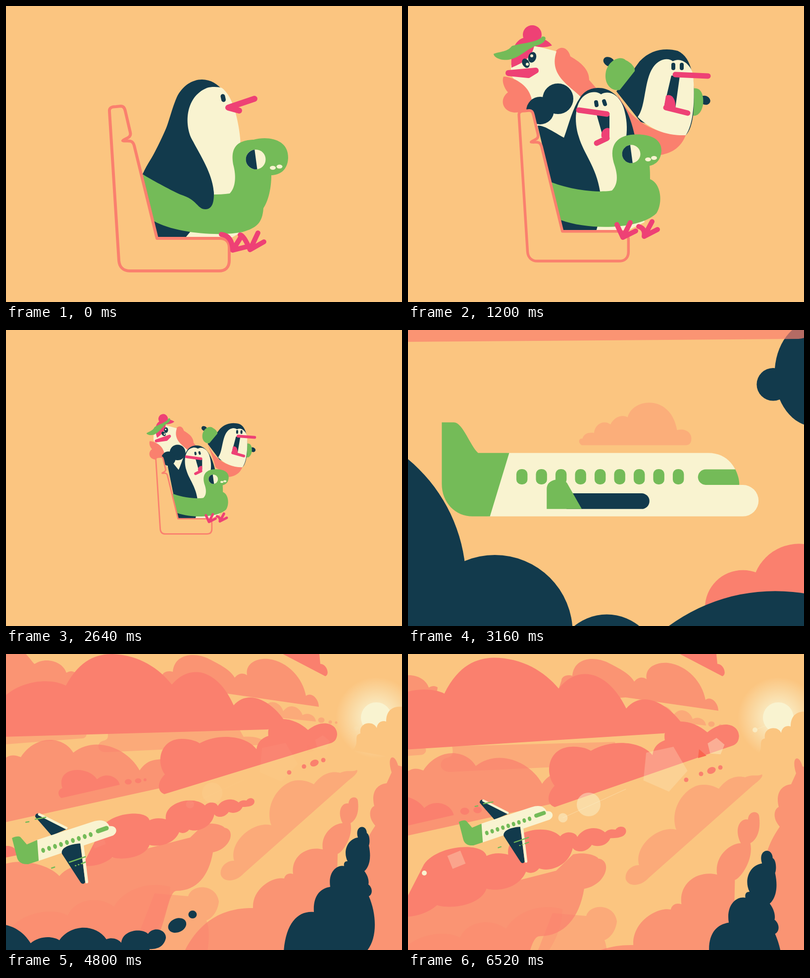
An HTML page with a canvas that plays this animation: 800x600 px, repeating every 6.56 s.

```html
<!DOCTYPE html>
<html lang="en">
<head>
<meta charset="utf-8">
<title>Holiday flight</title>
<style>
html, body { margin: 0; height: 100%; overflow: hidden; background: #fbc580; }
canvas { display: block; }
</style>
</head>
<body>
<canvas id="stage" width="800" height="600"></canvas>
<script>
const ctx = document.getElementById('stage').getContext('2d');
const SKY = '#fbc580', NAVY = '#123a4c', CREAM = '#f9f3d0', CORAL = '#fa806e', PINK = '#ee4175', GREEN = '#74bb58';
const LOOP = 6560, CAST_SCALE = 0.914;

const lerp = (a, b, k) => a + (b - a) * k;
const ramp = (t, a, b) => Math.min(1, Math.max(0, (t - a) / (b - a)));
const smooth = k => k * k * (3 - 2 * k);
const backOut = k => 1 + 2.4 * (k - 1) ** 3 + 1.4 * (k - 1) ** 2;

// Blends two paths that share the same commands.
function mix(a, b, k) {
  const ends = b.match(/-?[\d.]+/g);
  let i = 0;
  return a.replace(/-?[\d.]+/g, v => lerp(+v, +ends[i++], k));
}
function fill(d, color, alpha = 1) {
  ctx.globalAlpha = alpha;
  ctx.fillStyle = color;
  ctx.fill(new Path2D(d));
  ctx.globalAlpha = 1;
}
function line(d, color, width) {
  ctx.strokeStyle = color;
  ctx.lineWidth = width;
  ctx.lineCap = ctx.lineJoin = 'round';
  ctx.stroke(new Path2D(d));
}
function dot(color, x, y, rx, ry = rx, turn = 0) {
  ctx.fillStyle = color;
  ctx.beginPath();
  ctx.ellipse(x, y, rx, ry, turn, 0, 7);
  ctx.fill();
}
const dots = (color, list) => list.forEach(d => dot(color, ...d));
function zoom(cx, cy, s, draw, dx = 0, dy = 0, turn = 0) {
  ctx.save();
  ctx.translate(cx + dx, cy + dy);
  ctx.rotate(turn);
  ctx.scale(s, s);
  ctx.translate(-cx, -cy);
  draw();
  ctx.restore();
}

// ---- passengers ----
function ladyFace() {
  fill('M209 125 C207 85 218 62 248 62 C272 62 285 72 291 80 C278 85 265 84 255 81 C250 108 225 118 209 125 Z', PINK);
  dot(PINK, 251, 58, 19);
  fill('M173 97 C185 92 200 94 210 81 C230 75 262 74 271 62 C282 60 280 73 264 79 C240 85 228 105 203 109 C185 111 173 103 173 97 Z', GREEN);
  dots(NAVY, [[238, 116, 7, 10, -0.5], [251, 104, 8, 11, 0.3]]);
  dots(CREAM, [[241, 118, 3], [250, 101, 3]]);
  line('M203 136 L258 131 L243 140 Z', PINK, 12);
}
function lady(sway) {
  const dx = 7 * sway, dy = 6 * sway;
  zoom(0, 0, 1, () => {
    fill('M292 112 C293 82 320 74 328 102 C352 116 366 130 366 150 L385 172 L345 190 C335 160 300 160 292 130 Z', CORAL);
    fill('M208 140 L208 120 L255 80 L300 92 C284 140 325 160 350 185 L316 267 L262 245 L245 190 Z', CREAM);
    fill('M193 143 C215 144 240 160 247 180 C258 205 238 216 215 216 C190 214 184 188 202 175 C194 166 189 152 193 143 Z', CORAL);
    dots(NAVY, [[303, 188, 31], [267, 212, 28]]);
  }, dx, dy);
  zoom(250, 90, 1, ladyFace, 10 * sway, 2 * sway, -0.25 * sway);
}
function swimmer() {
  dots(NAVY, [[406, 113, 12, 9, 0.5], [600, 191, 11, 9, 0.4]]);
  fill('M577 167 C592 165 598 180 596 200 C592 220 582 224 574 222 Z', GREEN);
  fill('M421 173 C440 150 455 130 468 112 C490 88 520 84 545 91 C575 105 580 150 577 210 C575 240 568 255 561 262 L470 235 Z', NAVY);
  fill('M421 173 C450 240 510 262 561 262 C552 285 535 298 510 302 L455 265 C440 215 430 200 421 173 Z', CORAL);
  fill('M464 225 C484 200 474 132 508 112 C520 105 530 108 535 112 C552 102 573 120 576 140 C580 190 577 240 561 262 C520 263 490 250 464 225 Z', CREAM);
  fill('M400 132 C407 108 430 100 440 110 C450 114 460 125 458 132 L428 170 C408 174 395 155 400 132 Z', GREEN);
  line('M536 119 V126 M553 119 V126', NAVY, 8);
  fill('M532 141 L549 142 L540 207 L517 205 Z', NAVY);
  fill('M517 206 L521 182 C532 176 542 188 540 208 Z', PINK);
  line('M540 139 L606 142 M521 206 L565 217', PINK, 11);
}
function traveller(k, sway) {
  const blend = (a, b) => mix(a, b, k);
  const shoulder = mix('M262 243 C272 240 295 256 315 267', 'M260 193 C270 205 285 228 314 263', sway);
  fill(blend('M276 341 C285 320 300 300 308 285 C325 255 332 215 345 185 C356 162 376 149 396 149 C430 149 455 185 466 230 L474 280 L455 470 L306 470 Z',
    shoulder + 'C325 240 332 208 348 185 C358 170 372 166 385 166 C425 166 448 215 458 262 L462 300 L440 457 L313 457 Z'), NAVY);
  fill(blend('M436 166 C455 180 465 215 470 245 C474 270 474 280 474 290 L480 456 L455 470 L362 470 L372 458 L420 382 C418 350 400 320 378 275 C360 245 360 185 406 166 C416 163 430 164 436 166 Z',
    'M390 179 C410 168 432 185 438 215 C443 235 443 255 440 270 L478 438 L440 457 L380 457 L383 446 L388 376 C380 325 355 300 345 265 C335 235 336 190 362 178 C375 172 384 175 390 179 Z'), CREAM);
  fill(blend('M276 341 C300 345 340 365 380 380 C400 383 430 383 452 380 C462 370 466 350 460 325 C450 280 475 272 500 271 C530 263 571 270 570 308 C569 335 550 343 536 343 C536 370 530 395 520 410 C518 440 506 450 478 458 C430 468 340 460 299 436 Z',
    'M289 357 C310 365 345 375 388 376 C395 375 405 376 412 374 C424 362 424 345 418 325 C404 285 420 265 450 261 C480 258 512 265 512 293 C511 315 498 322 488 324 C489 335 489 340 489 351 C512 360 515 400 502 420 C470 452 370 456 309 434 Z'), GREEN);
  if (k < 0.5) {
    fill('M276 341 C290 350 330 372 352 382 C388 393 386 412 403 412 C418 412 420 395 420 380 C418 345 400 315 378 275 L340 205 C325 250 300 300 276 341 Z', NAVY);
    line('M438 183 L439.5 190', NAVY, 9);
    line('M502 188 L449 206 L471 212', PINK, 12);
  } else {
    line('M380 195 L381 201 M396 193 L398 199', NAVY, 8);
    fill('M381 220 H407 V262 H393 Z', NAVY);
    fill('M391 266 C388 252 400 245 407 248 V268 Z', PINK);
    line('M345 211 L402 219 M402 268 L381 278', PINK, 11);
  }
  const x = lerp(504.5, 451, k), y = lerp(311, 300, k), r = lerp(20, 18.5, k);
  dot(CREAM, x, y, r);
  ctx.fillStyle = NAVY;
  ctx.beginPath();
  ctx.arc(x, y, r, 1.42, 4.6);
  ctx.fill();
  dots(CREAM, [[lerp(539, 485, k), lerp(328, 311, k), 6, 4], [lerp(552.5, 497, k), lerp(325.5, 308, k), 6, 4]]);
}
function feet(k) {
  line(mix('M435 463 Q457 466 458 495 L476 466 M458 495 L486 488 M473 464 Q480 464 493 494 L509 460 M493 494 L521 478',
    'M422 443 Q428 456 434 469 L449 439 M434 469 L460 456 M466 447 Q480 451 477 467 L493 437 M477 467 L504 453', k), PINK, 10);
}
function cast(t) {
  const sec = t / 1000;
  const s = Math.max(0, 1 - 0.058 * sec - 0.0078 * sec ** 4);
  const k = smooth(ramp(t, 520, 800));
  const sway = smooth(ramp(t, 1250, 2600));
  const at = (size, draw) => zoom(385, 305, s / size, draw);
  const size = lerp(1, CAST_SCALE, k);
  at(CAST_SCALE, () => {
    const a = backOut(ramp(t, 700, 960)), b = backOut(ramp(t, 740, 1040));
    if (a > 0) zoom(310, 290, a, () => lady(sway));
    if (b > 0) zoom(500, 200, b, swimmer, 7 * sway + 50 * (b - 1), 80 * (1 - b) - 11 * sway, 0.03 * sway);
  });
  at(size, () => traveller(k, sway));
  at(1, () => {
    const seat = 'M209 214 C208 206 214 204 222 204 L232 203 C238 203 240 208 241 213 L251 256 C254 268 240 268 236 273 C245 275 255 269 259 283 L305 471 L432 471 C446 471 451 480 451 490 L451 516 C451 530 443 537 430 537 L250 537 C236 537 229 528 228 516 Z';
    fill(seat, SKY);
    line(seat, CORAL, 6);
  });
  at(size, () => feet(k));
}

// ---- side view of the plane, camera pulling back ----
const porthole = i => {
  const p = new Path2D();
  p.roundRect(218.5 + 39.6 * i, 282, 22.5, 31, 10);
  return p;
};
function sidePlane(t) {
  fill('M200 249 L607 249 C647 249 668 280 670 314 L677 314 A32 32 0 0 1 677 378 L160 378 Z', CREAM);
  fill('M67.5 187 L92 187 C110 187 125 235 141 249 L204 249 L165 378 L130 378 C95 378 67.5 350 67.5 312 Z', GREEN);
  ctx.fillStyle = GREEN;
  for (let i = 0; i < 9; i++) ctx.fill(porthole(i));
  if (t < 3000) {
    ctx.save();
    ctx.clip(porthole(4));
    ctx.fillStyle = SKY;
    ctx.fill(porthole(4));
    ctx.save();
    ctx.resetTransform();
    cast(t);
    ctx.restore();
    ctx.globalAlpha = ramp(t, 2800, 3000);
    ctx.fillStyle = GREEN;
    ctx.fill(porthole(4));
    ctx.restore();
  }
  fill('M602 282.5 L662 282.5 C667 293 670 303 670 314 L602 314 A15.5 15.5 0 0 1 602 282.5 Z', GREEN);
  fill('M320 331 H472 A16 16 0 0 1 472 363 H320 Z', NAVY);
  fill('M280 363 V322 C280 300 312 299 321 310 L351 363 Z', GREEN);
}
function pullBack(t) {
  const p = 1.12 * Math.exp((3160 - t) / 303) - 0.12;
  const layer = (depth, speed, cy, draw) => zoom(388, cy, depth ** p, draw, (3840 - t) * speed);
  layer(1.45, 0.082, 300, () => {
    const puff = 'M324 254 C318 250 320 244 325 245 C327 237 335 236 341 237 C343 222 357 219 364 225 C370 213 382 211 388 215 C395 188 448 182 457 233 C468 230 477 236 477 245 C477 251 474 254 470 254 Z';
    fill(puff, CORAL, 0.35);
    ctx.translate(682, 398);
    ctx.scale(0.76, 0.97);
    ctx.translate(-320, -254);
    fill(puff, CORAL, 0.35);
  });
  layer(1.67, 0.042, 320, () => {
    dots(CORAL, [[544, 466, 46], [612, 445, 57], [688, 452, 33], [733, 476, 17], [752, 491, 13], [805, 486, 42], [720, 524, 18], [771, 515, 33]]);
    fill('M560 450 H690 L780 490 V530 H600 Z', CORAL);
  });
  zoom(388, 302, 0.511 * 1.957 ** p, () => sidePlane(t));
  layer(1.45, 0.08, 300, () =>
    dots(NAVY, [[592, 169, 23], [650, 154, 56, 74], [740, 155, 56, 88], [820, 60, 88], [840, 200, 80], [890, 130, 110]]));
  layer(2.16, 0.204, 303, () => {
    dots(NAVY, [[47, 400, 151], [225, 447, 73], [330, 478, 48], [488, 576, 168], [678, 582, 55], [738, 585, 30]]);
    fill('M-300 470 H615 V560 H765 V900 H-300 Z', NAVY);
    line('M-93 647 A131 131 0 0 1 169 647 M212 687 A138 138 0 0 1 488 687', CORAL, 6);
  });
  layer(2.4, 0.168, 286, () => {
    fill('M103 177 C94 176 95 170 92 163 C86 138 108 118 131 124 C127 70 160 36 212 36 C250 36 268 60 276 76 C290 64 305 62 327 69 C340 40 370 0 420 -1 C480 0 512 55 512 117 C540 120 542 170 508 174 Z', CORAL, 0.7);
    fill('M62 0 C62 30 90 40 113 40 C130 40 140 33 145 28 C165 38 200 30 207 8 C220 30 240 42 270 42 C310 42 335 25 337 0 C350 5 360 3 368 0 L368 -60 L62 -60 Z', CORAL);
  });
}

// ---- sunset ----
function wingedPlane(t) {
  fill('M59 330 C59 322 66 322 72 326 L125 354 L92 368 Z', NAVY);
  line('M67 325 L122 353', CREAM, 5);
  fill('M62 377 L175 340 C195 333 205 340 209 349 C223 347 228 361 216 368 L64 420 Z', CREAM);
  fill('M12 373 C20 369 26 369 29 371 L42 386 L63 377 L66 419 L45 426 C30 427 24 420 22 412 Z', GREEN);
  for (let i = 0; i < 9; i++) dot(GREEN, 75 + 12 * i, 398 - 4 * i, 3.8, 5, -0.3);
  line('M186 359 L203 353', GREEN, 9);
  fill('M113 405 C110 392 130 385 150 384 L160 462 C158 468 152 466 150 462 Z', NAVY);
  line('M154 388 L163 462', CREAM, 6);
  const wave = Math.sin((t - 4800) / 130) * 14;
  ctx.save();
  ctx.translate(wave, -wave / 3);
  line('M40 341 L46 340 M59 335 L80 331 M128 422 L160 411 M140 429 h1 M146 427 h1 M152 425 L160 422 M92 434 L98 432', GREEN, 2.6);
  ctx.restore();
}
function polygon(n, x, y, r, turn, alpha) {
  ctx.beginPath();
  for (let i = 0; i < n; i++) {
    const a = turn + i * 2 * Math.PI / n;
    ctx.lineTo(x + r * Math.cos(a), y + r * Math.sin(a));
  }
  ctx.fillStyle = `rgba(249,243,208,${alpha})`;
  ctx.fill();
}
function flare(m) {
  const g = Math.min(1, Math.max(0, 0.15 + 0.85 * m));
  const glow = a => `rgba(249,243,208,${a * g})`;
  zoom(748, 130, lerp(0.865, 1, m), () => {
    polygon(5, 517, 232, 48, 0.1, 0.25 * g);
    polygon(5, 622, 188, 18, -1.5, 0.4 * g);
    polygon(4, 98, 417, 20, 0.4, 0.3 * g);
    dot(glow(0.45), 365, 305, 24);
    dot(glow(0.5), 313, 332, 9.5);
    dot(glow(0.7), 701, 154, 5);
    dot(glow(m > 0.5 ? 1 : 0), 33, 444, 5);
    fill('M588 193 L603 206 L586 211 Z', '#fb6550', g * g);
    line('M313 332 L440 274 M701 154 L738 139', glow(0.35), 1);
  });
}
function sunset(t) {
  const m = (t - 4800) / 1720;
  const shift = (dx, dy, draw) => zoom(0, 0, 1, draw, dx * m, dy * m);
  const near = (k, draw, cy = 125, turn = 0) => zoom(688, cy, 1 + (k - 1) * m, draw, 0, 0, turn * m);

  const sun = ctx.createRadialGradient(748, 129, 28, 748, 129, 82);
  sun.addColorStop(0, 'rgba(249,243,208,.75)');
  sun.addColorStop(1, 'rgba(249,243,208,0)');
  dot(sun, 748, 129, 82);
  dot(CREAM, 748, 129, 31);
  shift(5, 10, () => fill('M700 195 C716 180 700 165 716 161 C712 138 742 134 749 150 C750 137 762 134 768 137 C768 108 790 102 812 110 V215 Z', SKY));

  shift(-80, 30, () => fill('M-20 -60 L30 -10 C50 8 55 20 58 20 C80 5 115 15 122 38 C130 33 137 35 140 38 L130 90 L-20 110 Z', CORAL, 0.7));
  shift(-5, 8, () => fill('M300 90 L315 46 C315 38 325 33 337 36 C340 0 380 -5 410 10 C440 25 455 35 462 48 C470 38 480 38 487 43 C483 20 505 8 530 10 C570 15 600 50 606 85 C616 76 632 90 632 107 L445 80 Z', CORAL, 0.7));
  shift(-24, 8, () => {
    fill('M520 125 L529 100 C543 92 557 104 560 116 C575 96 595 110 599 124 C610 117 625 124 626 137 L560 130 Z', CORAL, 0.4);
    dots('#faaa79', [[637, 134, 6.5, 5.5], [655, 138, 3.5], [667, 139, 2.5]]);
  });
  shift(-10, 0, () => fill('M542 -9 L645 45 C655 42 648 20 635 20 L632 -10 Z', CORAL));
  near(1.24, () => {
    fill('M205 157 C208 170 205 174 196 176 C182 180 183 200 203 199 L520 184 C530 178 510 165 480 168 L470 150 Z', CORAL, 0.4);
    fill('M-40 160 L157 157 C166 160 163 170 155 171 L-40 186 Z', CORAL, 0.4);
  }, 32);
  shift(1, 27, () => fill('M-60 200 L0 210 C10 203 20 205 30 209 C60 163 115 165 136 200 C180 165 245 190 270 236 C285 214 300 213 330 213 L320 270 L-60 354 Z', CORAL, 0.7));
  near(1.3, () => {
    fill('M112 292 C103 286 105 274 114 272 C100 228 165 225 184 254 C200 239 226 247 230 265 Z', CORAL);
    dots(CORAL, [[247, 259, 7, 5.5], [267, 257, 6.5, 5], [281, 255, 3]]);
  }, 60);
  near(1.08, () => {
    fill('M-80 170 V105 L0 83 C40 50 95 50 121 64 C150 10 185 0 215 0 C270 2 310 30 335 62 C375 15 430 35 460 104 C490 70 535 95 562 134 L529 153 Z', CORAL);
    fill('M320 284 C307 280 303 262 321 244 C302 218 312 172 355 172 C375 172 387 178 391 181 C430 160 485 165 506 193 C508 180 515 171 530 166 C525 120 580 125 610 154 C640 130 669 141 669 163 C668 175 662 179 655 181 Z', CORAL);
  }, 130, -0.035);
  shift(-10, 15, () => dots(CORAL, [[572, 240, 4.5], [602, 228, 4.5], [623, 221, 9, 6.5, -0.4], [641, 215, 4.5]]));
  shift(6, 9, () => fill('M434 448 C431 430 448 418 461 419 C450 380 500 338 536 347 C520 300 560 255 590 256 C605 255 618 262 622 264 C640 240 660 237 675 241 C690 234 700 240 709 235 C713 240 700 250 690 258 L480 445 C465 462 440 464 434 448 Z', CORAL, 0.4));

  shift(-8, 40, () => fill('M300 485 L368 491 C375 465 425 465 430 502 C428 520 418 535 405 540 C413 560 411 590 400 640 L240 640 Z', CORAL, 0.4));
  near(1.23, () => fill('M-80 430 L0 425 C30 415 85 425 108 450 C120 435 140 428 155 428 L372 372 L400 345 C425 340 442 350 441 352 C465 355 455 395 418 402 C410 450 385 480 345 480 C325 480 325 560 290 600 L-80 660 Z', CORAL, 0.7), 80);
  shift(-20, 45, () => fill('M10 555 C40 520 100 515 125 530 C140 495 190 490 218 512 C240 475 290 460 332 472 C330 530 300 565 270 600 L0 620 Z', CORAL, 0.25));
  near(1.33, () => fill('M-60 395 L0 389 C15 388 25 398 22 408 L-60 425 M155 428 L195 350 C215 320 285 315 290 337 C300 332 312 332 323 335 C318 300 380 285 402 307 C410 298 425 300 428 308 C436 294 458 290 470 301 C475 296 481 296 486 297 C490 290 502 291 502 299 C502 308 490 310 478 310 C472 324 455 323 450 320 C442 333 425 332 421 325 C415 353 385 362 370 356 C364 364 355 364 350 361 C340 385 310 392 290 387 C280 415 230 418 215 412 C195 430 165 432 155 428 Z', CORAL), 118);
  shift(5, 2, () => fill('M779 240 C768 205 785 200 792 226 L830 235 V640 H660 L720 400 C728 375 738 360 746 348 C730 330 735 312 744 308 C738 285 745 265 769 262 Z', CORAL, 0.7));
  zoom(718, 140, 1 + 0.2 * m, () => fill('M360 604 C395 532 450 514 499 515 C497 475 540 450 562 455 C564 446 572 443 580 446 C575 410 608 388 640 396 C635 365 662 343 680 343 C668 320 678 300 692 303 C693 287 711 287 711 299 C714 325 705 338 696 343 C702 370 680 402 670 405 L665 640 H340 Z', CORAL, 0.7));
  zoom(690, 110, 1 + 0.2 * m, () => fill('M561 604 C565 545 590 520 622 523 C620 490 635 475 655 472 C650 440 670 427 683 430 C682 424 684 420 690 420 C680 400 690 375 711 372 C703 348 728 343 729 363 C736 367 735 385 733 388 C740 420 730 435 724 440 C734 453 733 465 732 467 C742 475 740 488 733 491 C750 530 750 580 727 604 Z', NAVY));
  near(1.5, () => {
    fill('M-60 540 L0 549 C25 555 40 570 50 586 C70 570 95 572 108 580 C130 548 180 545 203 578 C215 574 225 577 233 585 C236 558 275 555 287 567 C300 550 325 560 323 576 C318 597 300 598 290 598 V660 H-60 Z', NAVY);
    dots(NAVY, [[346, 550, 19, 14, -0.4], [377, 528, 8.5, 8]]);
  });

  const late = Math.max(0, 4800 - t);
  const ahead = 80 * m - 0.0015 * late ** 2;
  zoom(117, 390, 1 - 0.1 * m, () => wingedPlane(t), ahead, -0.43 * ahead);
  flare(m);
}

function frame() {
  const t = performance.now() % LOOP;
  ctx.fillStyle = SKY;
  ctx.fillRect(0, 0, 800, 600);
  if (t < 2660) cast(t);
  else if (t < 4400) pullBack(t);
  else sunset(t);
  requestAnimationFrame(frame);
}
frame();
</script>
</body>
</html>
```
